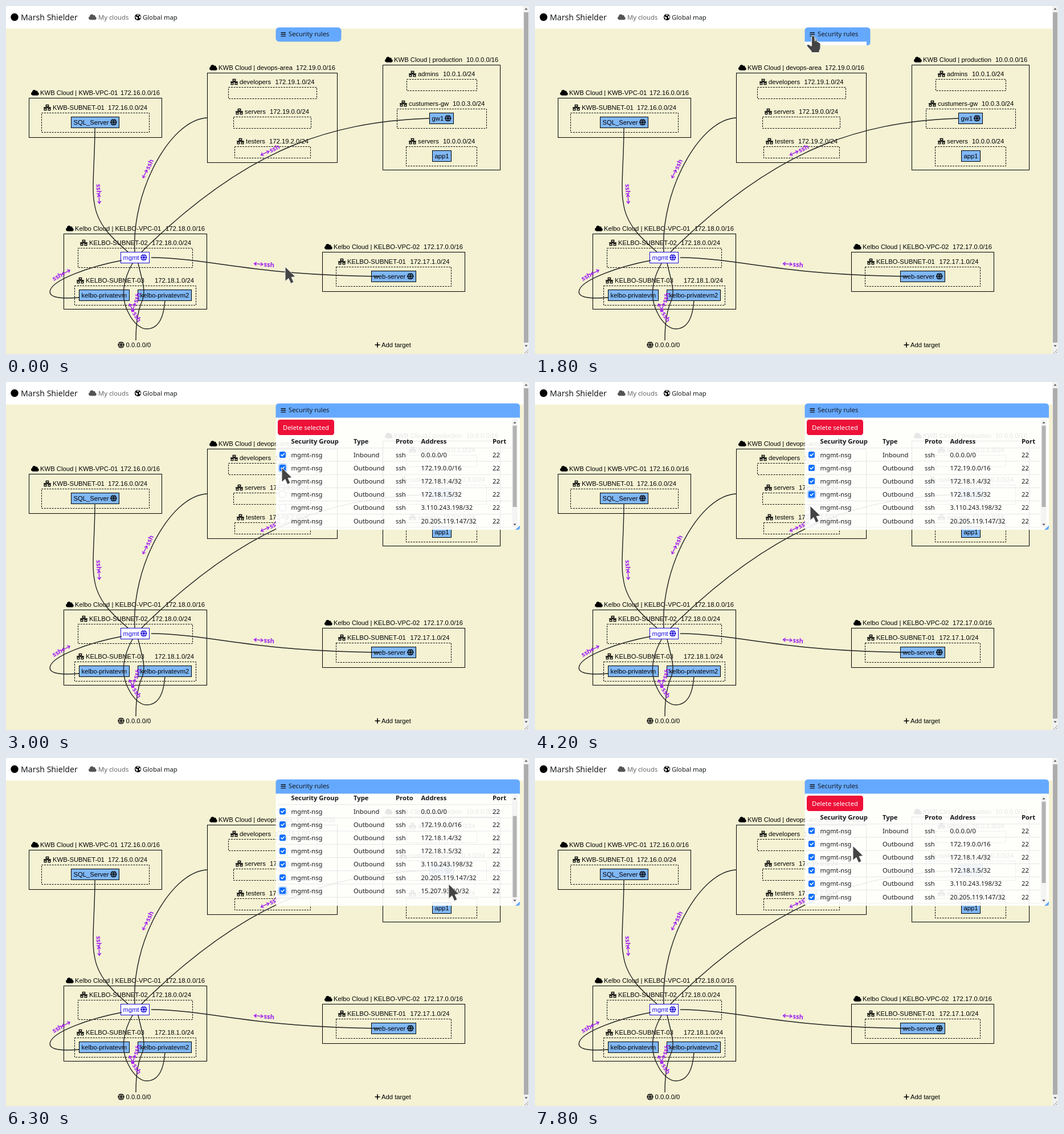
Recreate the animation shown at these times as an HTML page. Size 918 px wide and 610 px high, loop 8000 ms.

```html
<!DOCTYPE html>
<html lang="en">
<head>
<meta charset="utf-8">
<title>Security rules</title>
<style>
html, body { margin: 0; width: 100%; height: 100%; overflow: hidden; background: #f4f2d3; }
svg { display: block; width: 918px; height: 610px; }
text { font: 11.28px "Liberation Sans", Arial, sans-serif; white-space: pre; }
.ui { font: 11.28px "Noto Sans", sans-serif; fill: #16191c; }
.brand { font-size: 14.1px; }
.bold { font-weight: 700; }
.muted { fill: #666; }
.light { fill: #fff; }
.ssh { font: 600 11.3px "Noto Sans", sans-serif; fill: #a020f0; }
.box { fill: none; stroke: #000; }
.dash { fill: none; stroke: #000; stroke-dasharray: 2.8 1.8; }
.edge { fill: none; stroke: #222; stroke-width: 1.4; }
</style>
</head>
<body>
<svg viewBox="0 0 918 610">
  <defs>
    <clipPath id="view"><rect x="474" y="65" width="414" height="190"/></clipPath>
  </defs>
  <g id="scene"></g>
  <g id="panel"></g>
  <g id="pointer"></g>
</svg>
<script>
const LOOP = 8000, STEP = 300;
const $ = id => document.getElementById(id);

// Basic parts
const text = (x, y, s, cls = '', fill = '') =>
  `<text x="${x}" y="${y}" class="${cls}"${fill && ` fill="${fill}"`}>${s}</text>`;
const rect = (x1, y1, x2, y2, attrs) =>
  `<rect x="${x1}" y="${y1}" width="${x2 - x1}" height="${y2 - y1}" ${attrs}/>`;
const path = (d, attrs) => `<path d="${d}" ${attrs}/>`;
const at = (x, y, body, more = '') => `<g transform="translate(${x} ${y}) ${more}">${body}</g>`;

// Icons
const cloudIcon = (x, y, fill = '#000') => at(x, y - 5.6, path(
  'M0 336c0 80 64 144 144 144H512c71 0 128-57 128-128c0-62-44-114-102-125c4-11 6-23 6-35' +
  'c0-53-43-96-96-96c-20 0-38 6-53 16C367 64 315 32 256 32C168 32 96 104 96 192v8C40 220 0 273 0 336z',
  `fill="${fill}"`), 'scale(.0215)');

const netIcon = (x, y) => at(x, y - 5.3, path(
  'M4.3.8h4.4v2.9H4.3zM1.2 7h3.6v2.9H1.2zM8.2 7h3.6v2.9H8.2zM0 5.3H13M6.5 3.7v1.6M3 5.3V7M10 5.3V7',
  'fill="none" stroke="#000" stroke-width="1.3"'));

const globeIcon = (x, y, fill, line) => at(x, y,
  `<circle r="5.7" fill="${fill}"/>` + path(
  'M-5.7-1.9H5.7M-5.7 1.9H5.7M0-5.7C-3.3-2.5-3.3 2.5 0 5.7C3.3 2.5 3.3-2.5 0-5.7',
  `fill="none" stroke="${line}" stroke-width=".8"`));

const earthIcon = (x, y) => at(x, y, '<circle r="5.6"/>' +
  path('M-4.6-1.5L-2.5-.2L-.5.2L.3 1.8L-1 2.8L-1.3 4.6L-2.6 3.4L-2.8 1.7L-4.5.4Z' +
       'M-.8-4.7L1.8-4.4L1-2.8L-.4-2.2L-1.4-3.2ZM2.2-2L4.4-2.2L4.8 1L3.6 2.4L2 .8Z', 'fill="#fff"'));

const barsIcon = path('M482.5 46.7h8.5M482.5 49.8h8.5M482.5 52.9h8.5',
  'stroke="#16191c" stroke-width="1.4"');

const triangle = (x, y, dir) =>
  path(`M${x - 2.6} ${y + dir * 1.4}h5.2l-2.6 ${-dir * 3}z`, 'fill="#505050"');

// Network diagram
const group = cls => (x1, y1, x2, y2, labelX, name, ipX, ip) =>
  rect(x1, y1, x2, y2, `class="${cls}"`) +
  (cls === 'box' ? cloudIcon : netIcon)(labelX - 16, y1 - 9.5) +
  text(labelX, y1 - 5.5, name) + text(ipX, y1 - 5.5, ip);
const cloud = group('box'), subnet = group('dash');

function node(x1, y1, x2, name, globe, ink = '#000', fill = '#80b7f5') {
  return rect(x1, y1, x2, y1 + 19, `fill="${fill}" stroke="${ink}"`) +
    text(x1 + 4, y1 + 13.2, name, '', ink) +
    (globe ? globeIcon(x2 - 9.7, y1 + 9.3, ink, fill) : '');
}

// A double arrow and "ssh", centred on a point beside an edge
function tag(x, y, angle, arrowLast) {
  const a = arrowLast ? 1.5 : -17, s = arrowLast ? -17 : 0;
  return at(x, y, path(`M${a} 0h15.5m-4-3l4 3l-4 3M${a + 4}-3l-4 3l4 3`,
    'fill="none" stroke="#a020f0" stroke-width="1.4"') + text(s, 3.6, 'ssh', 'ssh'), `rotate(${angle})`);
}

const edges = [
  'M156 213C156 270 150 320 155 345C160 385 190 410 214 431',
  'M354 196C288 198 220 326 226 431',
  'M743 197C560 203 415 257 238 431',
  'M255 441C360 442 430 472 655 474',
  'M203 446C150 456 78 480 77 501C77 513 105 513 128 511',
  'M222 451C206 480 200 510 215 538C224 556 236 566 247 566C268 566 277 545 279 516',
  'M232 451C238 480 248 500 237 522C230 540 228 560 228 586'
];

function scene() {
  return rect(0, 0, 918, 610, 'fill="#f4f2d3"') +
    rect(0, 0, 908, 39.5, 'fill="#fff"') +
    '<circle cx="15" cy="19.5" r="6.7"/>' + text(26, 24.5, 'Marsh Shielder', 'ui brand') +
    cloudIcon(145, 19.5, '#555') + text(162, 23.6, 'My clouds', 'ui muted') +
    earthIcon(231.5, 19.5) + text(240, 23.6, 'Global map', 'ui') +

    cloud(40.5, 161.5, 273.5, 230.5, 60, 'KWB Cloud | KWB-VPC-01', 201, '172.16.0.0/16') +
    subnet(62.5, 187.5, 251.5, 221.5, 82, 'KWB-SUBNET-01', 179, '172.16.0.0/24') +
    node(114.5, 194.5, 198.5, 'SQL_Server', true) +

    cloud(353.5, 117.5, 581.5, 274.5, 373, 'KWB Cloud | devops-area', 509, '172.19.0.0/16') +
    subnet(390.5, 142.5, 545.5, 162.5, 410, 'developers', 472.5, '172.19.1.0/24') +
    subnet(399.5, 194.5, 535.5, 214.5, 419, 'servers', 463, '172.19.0.0/24') +
    subnet(401.5, 246.5, 534.5, 266.5, 421, 'testers', 462, '172.19.2.0/24') +

    cloud(661.5, 103.5, 867.5, 287.5, 681, 'KWB Cloud | production', 808, '10.0.0.0/16') +
    subnet(703.5, 128.5, 826.5, 148.5, 723, 'admins', 767, '10.0.1.0/24') +
    subnet(686.5, 180.5, 843.5, 214.5, 707, 'custumers-gw', 784, '10.0.3.0/24') +
    node(743.5, 187.5, 785.5, 'gw1', true) +
    subnet(702.5, 246.5, 826.5, 280.5, 723, 'servers', 767, '10.0.0.0/24') +
    node(748.5, 253.5, 781.5, 'app1') +

    cloud(101.5, 399.5, 352.5, 531.5, 121, 'Kelbo Cloud | KELBO-VPC-01', 280, '172.18.0.0/16') +
    subnet(126.5, 424.5, 327.5, 458.5, 146, 'KELBO-SUBNET-02', 256, '172.18.0.0/24') +
    node(201.5, 431.5, 251.5, 'mgmt', true, '#1a0dd8', '#fff') +
    subnet(120.5, 490.5, 333.5, 524.5, 140, 'KELBO-SUBNET-03', 261, '172.18.1.0/24') +
    node(128.5, 497.5, 216.5, 'kelbo-privatevm') +
    node(231.5, 497.5, 325.5, 'kelbo-privatevm2') +

    cloud(555.5, 431.5, 805.5, 500.5, 575, 'Kelbo Cloud | KELBO-VPC-02', 733, '172.17.0.0/16') +
    subnet(579.5, 457.5, 781.5, 491.5, 599, 'KELBO-SUBNET-01', 709.5, '172.17.1.0/24') +
    node(641.5, 464.5, 719.5, 'web-server', true) +

    edges.map(d => path(d, 'class="edge"')).join('') +
    tag(163, 329, 87, true) + tag(248, 286, -64) + tag(463, 254, -25) + tag(452.5, 453, 5) +
    tag(97, 471, -28, true) + tag(227, 520, -70) + tag(225, 537, 60) +

    globeIcon(202, 594, '#000', '#f4f2d3') + text(210.5, 598, '0.0.0.0/0') +
    path('M647.5 594h9M652 589.5v9', 'stroke="#000" stroke-width="1.6"') + text(659, 598, 'Add target') +

    rect(908, 0, 918, 610, 'fill="#f1f1f1"') + rect(909, 11, 917, 590, 'fill="#acacac"') +
    triangle(913, 5, 1) + triangle(913, 596, -1) +
    path('M910 609l7-7M914 609l3-3', 'stroke="#888"');
}

// Rules panel
const rules = ['0.0.0.0/0', '172.19.0.0/16', '172.18.1.4/32', '172.18.1.5/32',
  '3.110.243.198/32', '20.205.119.147/32', '15.207.93.40/32'];
const columns = [500.5, 610, 684, 728.5, 854];
const checkTimes = [2700, 3000, 3300, 3900, 4500, 4800, 6000];

const title = barsIcon + text(496, 53.2, 'Security rules', 'ui');
const header = right =>
  path(`M473.5 62.5V43.5q0-6 6-6H${right - 6}q6 0 6 6V62.5z`, 'fill="#65a9ff"') + title;

const cells = (y, list, cls = '') =>
  list.map((s, i) => text(columns[i], y, s, 'ui ' + cls)).join('');

const rowLine = y => path(`M477 ${y}H887`, 'stroke="#dee2e6" stroke-width=".8"');

function checkbox(y, on, focus) {
  const box = rect(480, y - 5.5, 491, y + 5.5,
    on ? 'rx="2.6" fill="#0d6efd"' : 'rx="2.6" fill="#fff" stroke="#dfe3e8" stroke-width=".7"');
  const ring = focus ? rect(477.6, y - 7.9, 493.4, y + 7.9, 'rx="4.5" fill="#b9d5ff"') : '';
  const mark = on ? path(`M482.8 ${y + .2}l2 2l3.6-4`,
    'fill="none" stroke="#fff" stroke-width="1.5" stroke-linecap="round" stroke-linejoin="round"') : '';
  return ring + box + mark;
}

const scrollAt = t => t < 5100 || t >= 7200 ? 0 : t < 5400 ? 28 : 34;

function panel(t) {
  if (t < 1800) return rect(473.5, 37.5, 588.5, 62.5, 'rx="6" fill="#65a9ff"') + title;
  if (t < 2100) return rect(474, 62, 582, 68.5, 'fill="#fff"') +
    path('M582 62h6.5v2q0 5-6.5 5z', 'fill="#65a9ff"') + header(588.5);

  const scroll = scrollAt(t), thumb = 76.5 + scroll * .74;
  const last = t < 6600 ? checkTimes.filter(c => c <= t).length - 1 : -1;
  const rows = rules.map((address, i) => {
    const y = 127.4 + i * 23.2;
    return rowLine(y + 11.5) + checkbox(y, t >= checkTimes[i], i === last) +
      cells(y + 4.1, ['mgmt-nsg', i ? 'Outbound' : 'Inbound', 'ssh', address, '22']);
  }).join('');
  const button = rect(477, 66, 576, 93, 'rx="4.2" fill="#ed1138"') +
    text(486, 83.6, 'Delete selected', 'ui light');

  return rect(473.5, 62, 902, 259, 'rx="4" fill="#fff" fill-opacity=".9"') +
    path('M894 259L902 251.5V255q0 4-4 4z', 'fill="#65a9ff"') + header(902) +
    '<g clip-path="url(#view)">' + at(0, -scroll,
      (scroll ? '' : button) +
      cells(108.2, ['Security Group', 'Type', 'Proto', 'Address', 'Port'], 'bold') +
      rowLine(115.7) + rows) + '</g>' +
    rect(888, 65, 898, 255, 'fill="#f4f4f4"') +
    rect(889.5, thumb, 896.5, thumb + 142.5, 'fill="#b3b3b3"') +
    triangle(893, 71, 1) + triangle(893, 250, -1);
}

// Pointer: time, x, y
const route = [
  [0, 490, 457], [300, 490, 445], [1500, 487, 90], [1800, 488, 52], [2100, 525, 170],
  [2400, 505, 145], [2700, 484, 127], [3000, 484, 150], [3300, 484, 173], [3900, 484, 196],
  [4200, 483, 217], [4500, 484, 221], [4800, 484, 243], [5100, 518, 230], [5700, 486, 233],
  [6000, 486, 233], [6300, 777, 221], [6600, 790, 200], [7200, 700, 170], [7800, 558, 154]
];
const look = 'fill="#444" stroke="#f4f4f4" stroke-width="1" stroke-linejoin="round"';
const arrow = path('M0 0V25.5L6 20.5L10 29.5L15 27L11 18.5L18 17.5Z', look);
const hand = path('M-2.5 2Q-2.5 0 0 0Q2.5 0 2.7 2L3.6 10Q6-.2 7 10.5Q9.5 10 10 12Q13 11.5 13 15' +
  'V21Q13 24 11 26V29.5H-3V27L-10 19Q-12 16-9 15.5Q-7 15-4 18L-2.5 18Z'.replace('', ''), look);
const beamShape = 'M-3.5-11Q0-11 0-9Q0-11 3.5-11M0-9V9M-3.5 11Q0 11 0 9Q0 11 3.5 11';
const beam = path(beamShape, 'fill="none" stroke="#fff" stroke-width="3"') +
  path(beamShape, 'fill="none" stroke="#222" stroke-width="1.3"');

function pointer(t) {
  const i = Math.max(1, route.findIndex(p => p[0] >= t));
  const [t0, x0, y0] = route[i - 1], [t1, x1, y1] = route[i];
  const k = (t - t0) / (t1 - t0);
  const shape = t === 1800 ? hand : t === 2100 ? beam : arrow;
  return at(x0 + (x1 - x0) * k, y0 + (y1 - y0) * k, shape);
}

$('scene').innerHTML = scene();
let shown = -1;

function draw(now) {
  const t = Math.floor(now % LOOP / STEP) * STEP;
  if (t !== shown) {
    shown = t;
    $('panel').innerHTML = panel(t);
    $('pointer').innerHTML = pointer(t);
  }
}

const start = performance.now();
function tick() {
  draw(performance.now() - start);
  requestAnimationFrame(tick);
}
tick();
</script>
</body>
</html>
```
